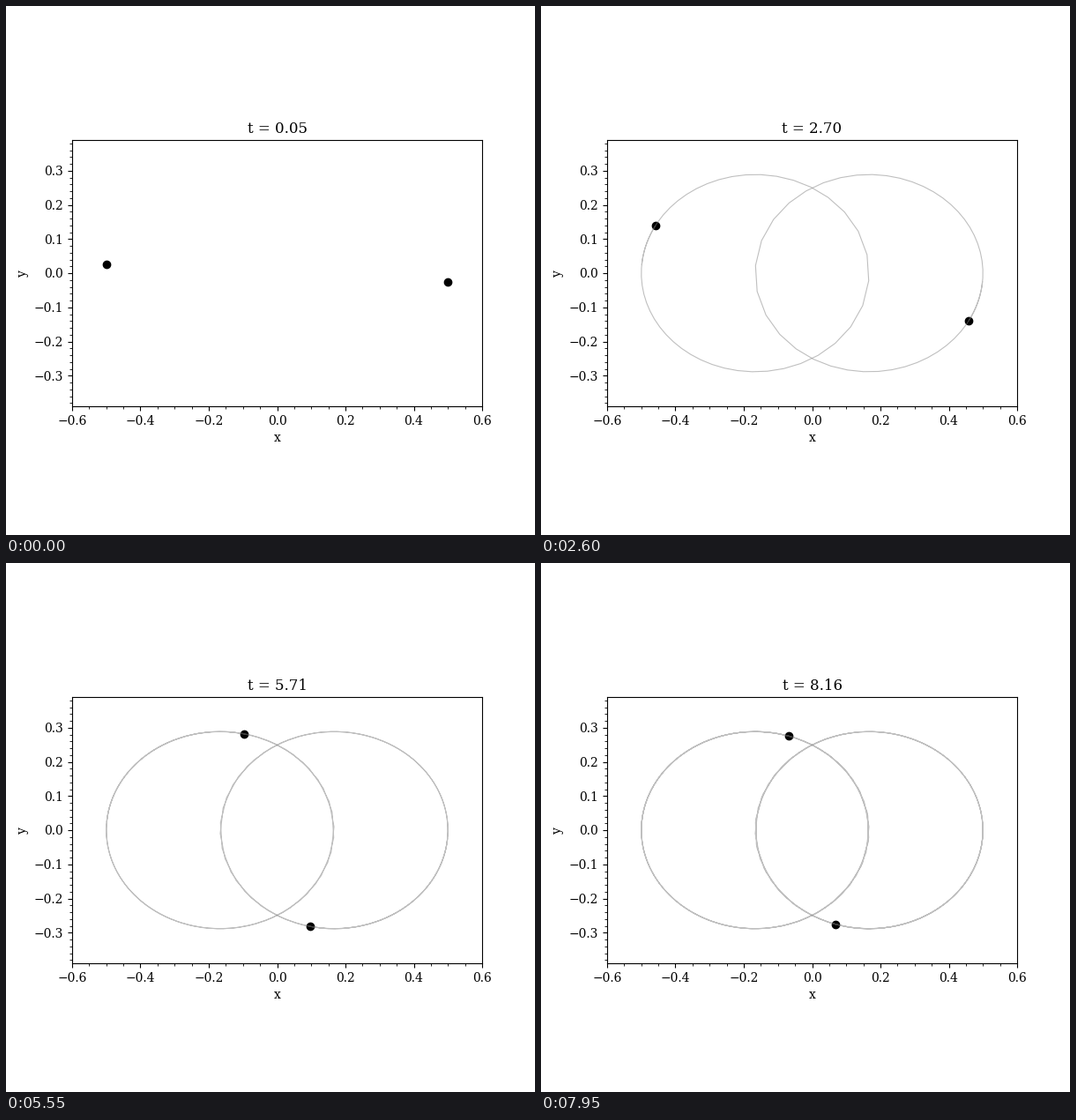
Write a matplotlib script that moves like this. It is 600 px wide and 600 px high and loops after 8000 ms.

```python
import numpy as np
import matplotlib.pyplot as plt
from matplotlib.animation import FuncAnimation

plt.rcParams["font.family"] = "DejaVu Serif"
plt.rcParams["mathtext.fontset"] = "dejavuserif"

FRAMES = 160
INTERVAL = 50
DT = 0.001      # time step
STRIDE = 51     # steps between two pictures

# Two equal masses on mirrored Kepler ellipses, starting at apocentre
A, ECC, MU = 1 / 3, 0.5, 0.25
B = A * np.sqrt(1 - ECC ** 2)
RATE = np.sqrt(MU / A ** 3)


def orbit(t):
    mean = RATE * t + np.pi
    ecc_anom = mean.copy()
    for _ in range(30):
        err = ecc_anom - ECC * np.sin(ecc_anom) - mean
        ecc_anom -= err / (1 - ECC * np.cos(ecc_anom))
    return A * (np.cos(ecc_anom) - ECC), -B * np.sin(ecc_anom)


x, y = orbit(DT * STRIDE * np.arange(1, FRAMES + 1))

# The clock is summed step by step and read just before each step ends
clock = np.cumsum(np.full(FRAMES * STRIDE, DT))[STRIDE - 2::STRIDE]

fig, ax = plt.subplots(figsize=(6, 6), dpi=100)
ax.set_aspect("equal")
ax.set_xlim(-0.6, 0.6)
ax.set_ylim(-0.39, 0.39)
ax.set_xlabel("x")
ax.set_ylabel("y")
ax.minorticks_on()
title = ax.set_title("")

bodies = []
for sign in (1, -1):
    dot, = ax.plot([], [], "o", color="black", zorder=2)
    trail, = ax.plot([], [], color="gray", lw=0.8, alpha=0.5, zorder=3)
    bodies.append((sign, dot, trail))


def draw(k):
    for sign, dot, trail in bodies:
        dot.set_data([sign * x[k]], [sign * y[k]])
        trail.set_data(sign * x[:k + 1], sign * y[:k + 1])
    title.set_text(f"t = {clock[k]:.2f}")
    return [title]


anim = FuncAnimation(fig, draw, frames=FRAMES, interval=INTERVAL,
                     init_func=lambda: draw(0), repeat=True, repeat_delay=0)
plt.show()
```
